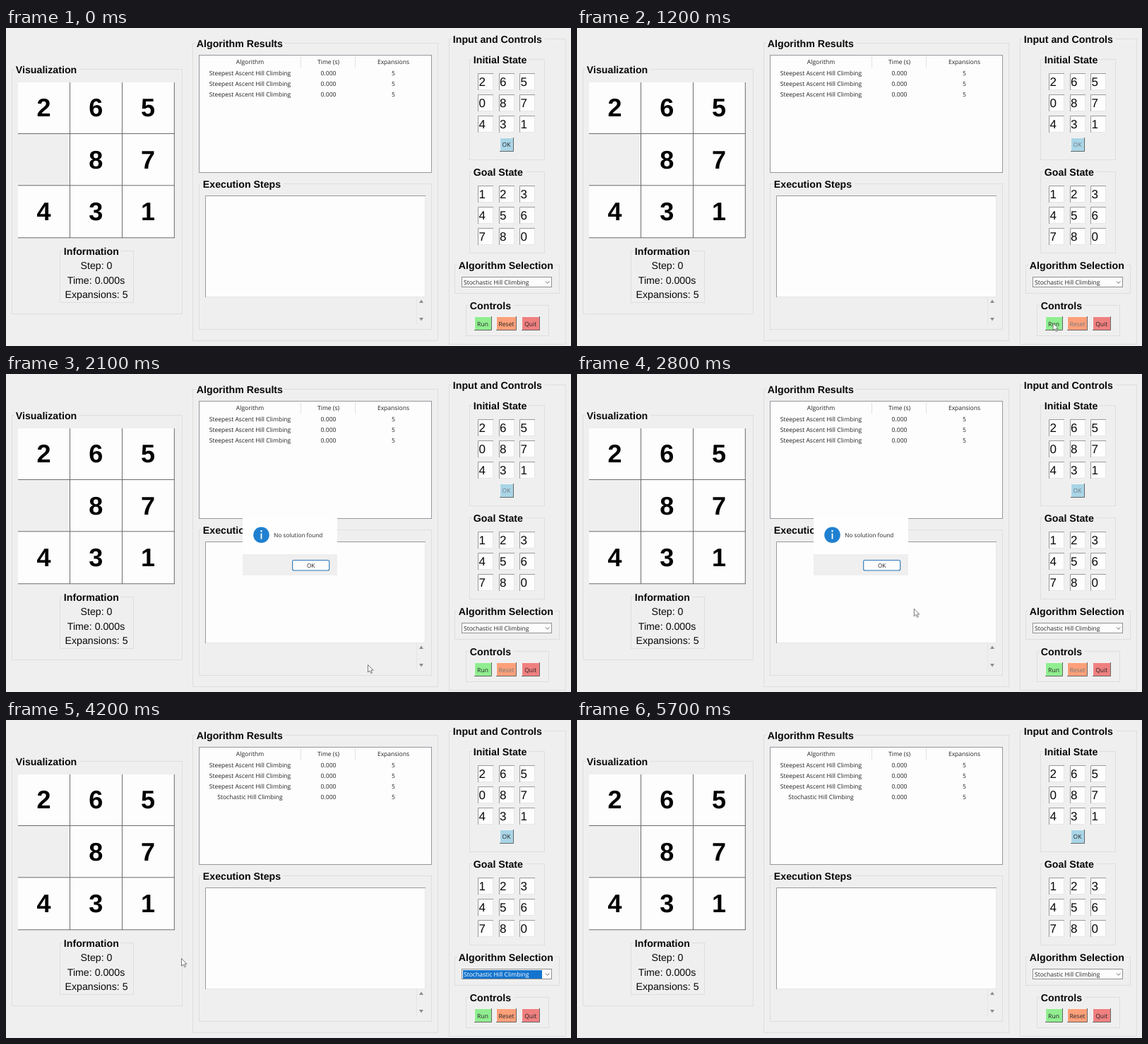
These frames come from a looping animation (800 px wide and 450 px high, 5.8 s). An HTML page:

```html
<!DOCTYPE html>
<html lang="en">
<head>
<meta charset="utf-8">
<title>Puzzle solver</title>
<style>
html, body { margin: 0; width: 100%; height: 100%; overflow: hidden; background: #efefef; }
svg { display: block; width: 800px; height: 450px; }
text { font-family: "Liberation Sans", Arial, sans-serif; font-size: 14.2px; fill: #080808; text-rendering: geometricPrecision; }
.title { font-weight: bold; }
.mid { text-anchor: middle; }
.tile { font-weight: bold; font-size: 36px; fill: #000; }
.entry { font-size: 17px; }
.ui { font-family: "Open Sans", "Noto Sans", sans-serif; font-size: 8.55px; fill: #222; }
.msg { font-size: 8.2px; }
.gray { fill: #70797c; }

.busy, .idle, .dialog, .done, .picked { animation: 5.8s step-end infinite; }
.busy { animation-name: busy; }
.idle { animation-name: idle; }
.dialog { animation-name: dialog; }
.done { animation-name: done; }
.picked { animation-name: picked; }
@keyframes busy { 0% { opacity: 0 } 18.97% { opacity: 1 } 62.93% { opacity: 0 } }
@keyframes idle { 0% { opacity: 1 } 18.97% { opacity: 0 } 62.93% { opacity: 1 } }
@keyframes dialog { 0% { opacity: 0 } 29.3% { opacity: 1 } 62.93% { opacity: 0 } }
@keyframes done { 0% { opacity: 0 } 62.93% { opacity: 1 } }
@keyframes picked { 0% { opacity: 0 } 62.93% { opacity: 1 } 95.7% { opacity: 0 } }

.click { animation: click 5.8s ease-in-out infinite, clickShow 5.8s step-end infinite; }
@keyframes click {
  0%, 13% { transform: translate(700px, 390px) }
  19%, 24% { transform: translate(673.5px, 417px) }
  34.5%, 43% { transform: translate(512px, 411px) }
  53%, 100% { transform: translate(448px, 267px) }
}
@keyframes clickShow { 0% { opacity: 0 } 13.8% { opacity: 1 } 61.2% { opacity: 0 } }

.leave { animation: leave 5.8s linear infinite, leaveShow 5.8s step-end infinite; }
@keyframes leave {
  0%, 61% { transform: translate(222px, 318px) }
  70%, 73.5% { transform: translate(248px, 337px) }
  83% { transform: translate(358px, 402px) }
  89%, 100% { transform: translate(420px, 452px) }
}
@keyframes leaveShow { 0% { opacity: 0 } 59.5% { opacity: 1 } 89.5% { opacity: 0 } }
</style>
</head>
<body>
<svg id="stage" viewBox="0 0 800 450"></svg>
<script>
const out = [];
const add = s => out.push(s);
const rect = (x, y, w, h, fill, extra = "") =>
  add(`<rect x="${x}" y="${y}" width="${w}" height="${h}" fill="${fill}" ${extra}/>`);
const path = (d, stroke, fill = "none", width = 1) =>
  add(`<path d="${d}" stroke="${stroke}" fill="${fill}" stroke-width="${width}"/>`);
const text = (x, y, s, cls) => add(`<text x="${x}" y="${y}" class="${cls}">${s}</text>`);
const group = (cls, draw) => { add(`<g class="${cls}">`); draw(); add("</g>"); };

// Labelled frame whose title interrupts the top edge
function frame(x, y, right, bottom, title, titleWidth) {
  rect(x + .5, y + .5, right - x, bottom - y, "none", 'stroke="#dedede"');
  rect(x + 4, y - 3, titleWidth + 4, 8, "#efefef");
  text(x + 5.8, y + 5.5, title, "title");
}

function sunken(x, y, w, h) {
  rect(x, y, w, h, "#fdfdfd");
  path(`M${x + .5} ${y + h}V${y + .5}H${x + w}`, "#999");
  path(`M${x + 1} ${y + h - .5}H${x + w - .5}V${y + 1}`, "#e6e6e6");
}

function button(x, y, w, h, fill) {
  rect(x, y, w, h, fill);
  path(`M${x + .5} ${y + h}V${y + .5}H${x + w}`, "#f4f4f4");
  path(`M${x} ${y + h - .5}H${x + w - .5}V${y}`, "#666");
}

function entries(top, digits) {
  [...digits].forEach((d, i) => {
    const x = 668 + (i % 3) * 29.5, y = top + Math.floor(i / 3) * 30;
    sunken(Math.round(x), y, 22, 24);
    text(x + 1.4, y + 17.7, d, "entry");
  });
}

function row(i, name) {
  const y = 67.4 + i * 14.8;
  text(345.5, y, name, "ui mid");
  text(456.5, y, "0.000", "ui mid");
  text(548.5, y, "5", "ui mid");
}

function cursor(cls) {
  group(cls, () => path("M.5 .5V11L3 8.8L4.8 12.6L6.5 11.8L4.8 8.2H8Z", "#555", "#fff", .8));
}

// Board
frame(8, 58, 249, 404, "Visualization", 88);
rect(17, 77, 221, 220, "#fdfdfd");
rect(17, 150, 73, 73, "#efefef");
path("M90.5 77V297M164.5 77V297M238.3 77V297M17 149.5H239M17 222.8H239M17 296.8H239", "#6c6c6c");
[..."265087431"].forEach((d, i) => {
  if (d !== "0") text(53.5 + (i % 3) * 73.7, 125 + Math.floor(i / 3) * 73.7, d, "tile mid");
});

frame(76, 315, 180, 388, "Information", 79);
text(128, 341, "Step: 0", "mid");
text(127.5, 361.7, "Time: 0.000s", "mid");
text(128, 382.4, "Expansions: 5", "mid");

// Results
frame(264, 21, 611, 442, "Algorithm Results", 122);
rect(273.5, 38.5, 329, 166, "#fdfdfd", 'stroke="#94979c"');
path("M417.5 40V56M494.5 40V56", "#e2e2e2");
text(345.5, 51, "Algorithm", "ui mid");
text(456.5, 51, "Time (s)", "ui mid");
text(548.5, 51, "Expansions", "ui mid");
for (let i = 0; i < 3; i++) row(i, "Steepest Ascent Hill Climbing");
group("done", () => row(3, "Stochastic Hill Climbing"));

frame(273, 220, 602, 426, "Execution Steps", 112);
sunken(282, 237, 312, 144);
path("M581.5 381V419", "#e4e4e4");
path("M585 389L588 384.5L591 389Z", "none", "#8c8c8c");
path("M585 410L588 414.5L591 410Z", "none", "#8c8c8c");

// Inputs
frame(627, 15, 792, 447, "Input and Controls", 128);
frame(656, 44, 762, 186, "Initial State", 76);
entries(64, "265087431");
frame(656, 203, 762, 318, "Goal State", 72);
entries(223, "123456780");
frame(635, 335, 783, 375, "Algorithm Selection", 135);
rect(645.5, 352.5, 127, 14, "#fdfdfd", 'stroke="#8f8f8f"');
text(648, 363, "Stochastic Hill Climbing", "ui");
group("picked", () => {
  rect(647, 354, 112, 12, "#1474cd");
  add('<text x="648" y="363" class="ui" style="fill:#fff">Stochastic Hill Climbing</text>');
});
path("M764 358.5L766.7 361.2L769.4 358.5", "#555", "none", .9);

frame(651, 392, 768, 435, "Controls", 60);
button(699, 155, 20, 20, "#a9d5e7");
button(663, 408, 25, 20, "#90ee90");
button(694, 408, 29, 20, "#fca07a");
button(730, 408, 26, 20, "#f08080");
text(675, 421.6, "Run", "ui mid");
text(742.7, 421.6, "Quit", "ui mid");
for (const [state, tone] of [["idle", ""], ["busy", "gray"]]) {
  group(state, () => {
    text(708.5, 168.4, "OK", "ui mid " + tone);
    text(708.5, 421.6, "Reset", "ui mid " + tone);
  });
}

// Message box
group("dialog", () => {
  rect(335, 204, 134, 51, "#fefefe");
  rect(335, 255, 134, 30, "#efefef");
  add('<circle cx="361.5" cy="227.7" r="11.3" fill="#1f80d0"/>');
  rect(360.6, 225.5, 1.8, 8, "#fff");
  add('<circle cx="361.5" cy="222.3" r="1.2" fill="#fff"/>');
  text(379.3, 231.3, "No solution found", "ui msg");
  rect(405.7, 263.5, 52, 14.5, "#fdfdfd", 'rx="2" stroke="#2877b8" stroke-width="1.1"');
  text(431.7, 274, "OK", "ui mid msg");
});

cursor("click");
cursor("leave");
document.getElementById("stage").innerHTML = out.join("");
</script>
</body>
</html>
```
